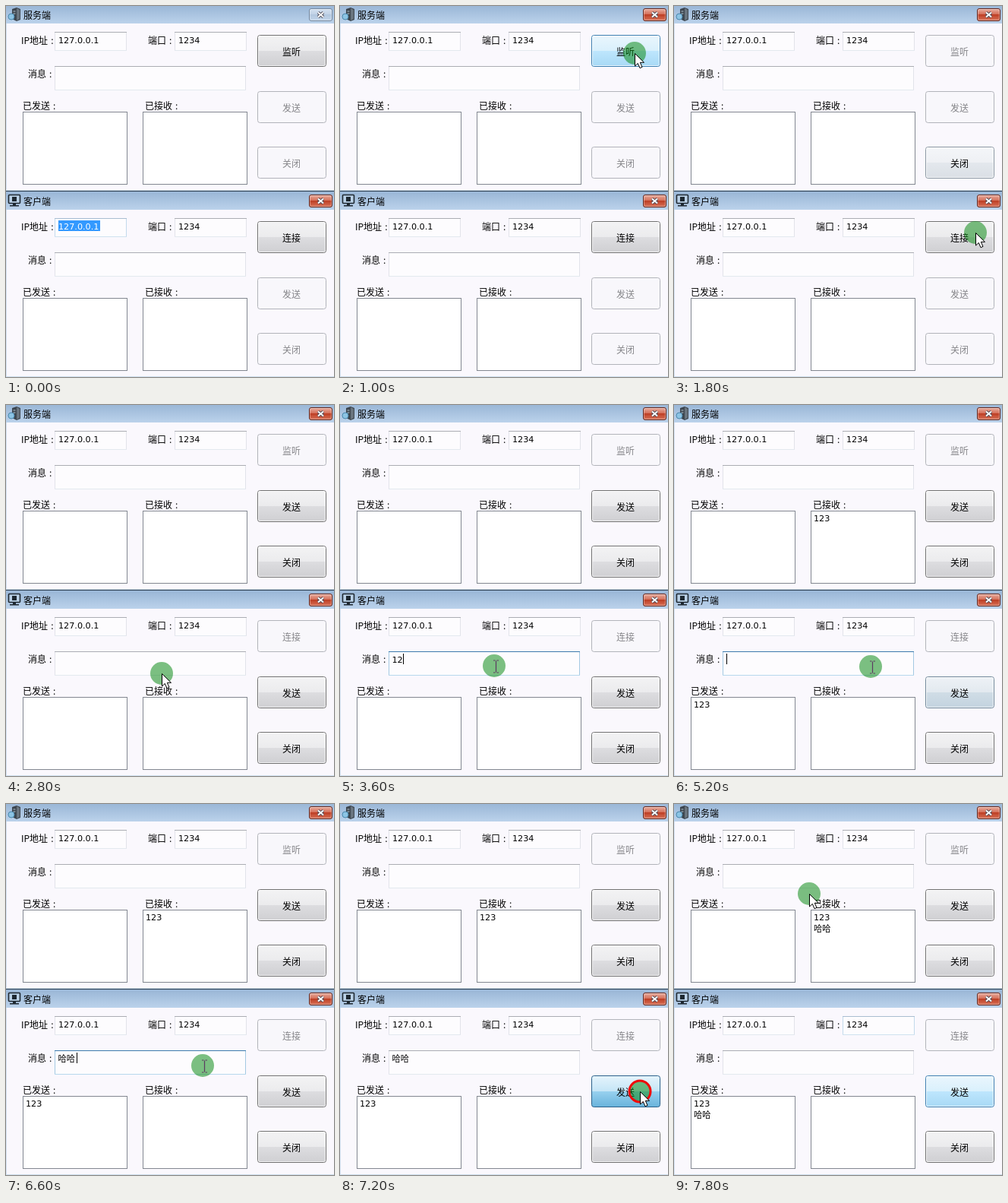
Animation, 432 px wide and 488 px high, one loop 8 s. Source, as an HTML page:

```html
<!DOCTYPE html>
<html lang="zh-CN">
<head>
<meta charset="utf-8">
<title>Socket</title>
<style>
html, body { margin: 0; width: 100%; height: 100%; overflow: hidden; background: #faf8fd; }
svg { display: block; width: 432px; height: 488px; }
text { font: 12px "Noto Sans CJK SC", "Noto Sans CJK", sans-serif; white-space: pre; }
.num { font: 11.2px "DejaVu Sans", "Noto Sans CJK SC", sans-serif; }
</style>
</head>
<body>
<svg viewBox="0 0 432 488">
  <defs id="defs"></defs>
  <g id="stage"></g>
</svg>
<script>
const LOOP = 8000, STEP = 200;
const stage = document.getElementById('stage');

// border, four gradient colours, label colour
const BUTTONS = {
  normal: ['#707070', '#f3f3f4', '#ebebed', '#dddde0', '#cfcfd2', '#000'],
  off: ['#b2b4ba', '#f8f7fb', '#f8f7fb', '#f8f7fb', '#f8f7fb', '#858589'],
  fade: ['#71889a', '#eef2f6', '#e2e9ef', '#d0dde6', '#c3d3df', '#000'],
  fresh: ['#8a97a2', '#f4f6f9', '#eef0f4', '#e4e8ed', '#dadfe5', '#000'],
  hover: ['#3c7fb1', '#eaf6fd', '#d9f0fc', '#bee6fd', '#a7d9f5', '#000'],
  press: ['#2c628b', '#e5f4fc', '#c4e5f6', '#98d1ef', '#68b3db', '#000']
};

// top, sides, bottom
const EDGES = {
  plain: ['#abadb3', '#e2e3ea', '#e3e9ef'],
  soft: ['#a9bdd0', '#c3daec', '#cfe2f0'],
  focus: ['#3d7bad', '#a4c9e3', '#b7d9ed']
};

const gradient = (id, stops) =>
  `<linearGradient id="${id}" x2="0" y2="1">${stops.map(([o, c]) =>
    `<stop offset="${o}" stop-color="${c}"/>`).join('')}</linearGradient>`;

document.getElementById('defs').innerHTML =
  Object.entries(BUTTONS).map(([name, c]) =>
    gradient(name, [[0, c[1]], [.5, c[2]], [.5, c[3]], [1, c[4]]])).join('') +
  gradient('title', [[0, '#99b6d6'], [1, '#bbd2eb']]) +
  gradient('red', [[0, '#e9b0a2'], [.45, '#d5705a'], [.45, '#bb3a20'], [1, '#d9745a']]) +
  gradient('pale', [[0, '#d3e0ef'], [.45, '#c2d3e7'], [.45, '#b1c6de'], [1, '#c4d6ea']]);

// Last value whose start time has passed.
function at(t, plan) {
  let value;
  for (const key in plan) if (t >= +key) value = plan[key];
  return value;
}

const rect = (x, y, w, h, fill, more = '') =>
  `<rect x="${x}" y="${y}" width="${w}" height="${h}" fill="${fill}" ${more}/>`;
const text = (x, y, s, fill = '#000', cls = '') =>
  `<text x="${x}" y="${y}" fill="${fill}" class="${cls}">${s}</text>`;
const num = (x, y, s, fill) => text(x, y, s, fill, 'num');
const label = (x, y, s) => text(x, y, `${s}<tspan dx="4">:</tspan>`);

function button(y, s, state) {
  const [edge, , , , , ink] = BUTTONS[state];
  const shine = state === 'off' || state === 'press' ? '' :
    rect(332.5, y + 1.5, 88, 39, 'none', 'rx="2" stroke="#fff" stroke-opacity=".75"');
  return rect(331.5, y + .5, 90, 41, `url(#${state})`, `rx="3" stroke="${edge}"`) +
    shine + text(364, y + 26.5, s, ink);
}

function edit(x, y, w, h, state = 'plain') {
  const [top, side, bottom] = EDGES[state];
  return rect(x, y, w, h, side) + rect(x + 1, y + 1, w - 2, h - 2, '#fdfcfe') +
    rect(x, y, w, 1, top) + rect(x, y + h - 1, w, 1, bottom);
}

const list = (x, lines) =>
  rect(x + .5, 139.5, 137, 95, '#fff', 'stroke="#828790"') +
  lines.map((s, i) => num(x + 4, 153 + i * 14.5, s)).join('');

function closeBox(active) {
  const cross = 'M411 8.5l7 6m0-6l-7 6';
  return rect(399.5, 3.5, 30, 16, `url(#${active ? 'red' : 'pale'})`,
      `rx="2.5" stroke="${active ? '#64261d' : '#7488a0'}"`) +
    rect(400.5, 4.5, 28, 14, 'none', 'rx="2" stroke="#fff" stroke-opacity=".35"') +
    `<path d="${cross}" stroke="#4c4b58" stroke-width="3.8"/>` +
    `<path d="${cross}" stroke="#fff" stroke-width="2"/>`;
}

const towerIcon =
  '<path d="M8 4l6-2 5 2v14l-5 2-6-3z" fill="#3d464f"/>' +
  '<path d="M14 3v16l4-2V5z" fill="#69747e"/>' +
  '<path d="M9.500 7h3m-3 3h3" stroke="#b4c4d0"/>' +
  '<circle cx="7" cy="14" r="4" fill="#8cc4e4" stroke="#4a87ad"/>';
const screenIcon =
  rect(3.5, 3.5, 15, 11, '#b9d0e6', 'rx="1" stroke="#1d2730" stroke-width="1.6"') +
  rect(8, 6, 6, 6, '#1d2730') +
  '<path d="M9 15h4v2h4v1.500h-12V17h4z" fill="#1d2730"/>';

function panel(top, w) {
  return `<g transform="translate(0 ${top})">` +
    rect(0, -2, 432, 245, '#faf8fd') +
    rect(0, -2, 432, 1, '#2b3c4c') +
    rect(0, -1, 432, 24, 'url(#title)') +
    rect(0, 23, 1, 219, '#d3e1f0') + rect(0, 242, 432, 1, '#cfdfee') +
    w.icon + text(23, 16.5, w.title) + closeBox(w.active) +
    label(20, 49.5, 'IP地址') + edit(64, 34, 95, 25, w.ipEdge) +
    (w.selected ? rect(69, 37, 55, 14, '#3399ff') : '') +
    num(69, 49, '127.0.0.1', w.selected ? '#fff' : '#000') +
    label(187, 49.5, '端口') + edit(222, 34, 95, 25, w.portEdge) + num(227, 49, '1234') +
    label(29, 94, '消息') + edit(64, 79, 252, 32, w.msgEdge) +
    num(68.5, 94, w.msg || '') +
    (w.caret ? rect(w.caret, 82, 1, 14, '#000') : '') +
    label(22, 136, '已发送') + label(183, 136, '已接收') +
    list(22, w.sent) + list(180, w.got) +
    button(38, w.action, w.states[0]) +
    button(112, '发送', w.states[1]) +
    button(185, '关闭', w.states[2]) + '</g>';
}

// time, x, y
const PATH = [
  [400, 418, 130], [600, 392, 72], [800, 388, 62], [1000, 388, 62], [1200, 392, 150],
  [1400, 396, 262], [1600, 397, 298], [2200, 397, 298], [2400, 350, 318],
  [2600, 240, 350], [2800, 205, 353], [3000, 203, 343], [3800, 203, 343],
  [4000, 290, 360], [4200, 390, 380], [4400, 395, 380], [4600, 395, 380],
  [4800, 320, 358], [5000, 262, 345], [5200, 259, 344], [6600, 259, 344],
  [6800, 335, 360], [7000, 393, 376], [7200, 395, 378], [7400, 390, 374],
  [7600, 295, 262], [7800, 178, 118]
];

function place(t) {
  const i = PATH.findIndex(p => p[0] > t);
  if (i < 0) return PATH[PATH.length - 1].slice(1);
  const [a, b] = [PATH[i - 1], PATH[i]];
  const k = (t - a[0]) / (b[0] - a[0]);
  return [1, 2].map(n => a[n] + (b[n] - a[n]) * k);
}

function pointer(t) {
  if (t < PATH[0][0]) return '';
  const [x, y] = place(t);
  const click = [800, 2000, 3000, 4400, 7200].includes(t);
  const beam = x > 64 && x < 316 && y > 324 && y < 350;
  const shape = beam ?
    '<path d="M-1 -7h2.500m2 0h2.500m-3.500 .5v15m-3.500 .5h2.500m2 0h2.500" fill="none" stroke="#5c3b62" stroke-width="1.2"/>' :
    '<path d="M.5 .5v16.500l3.800-3.600 2.700 6.300 3-1.300-2.700-6.100h5.200z" fill="#fff" stroke="#000"/>';
  return `<g transform="translate(${x} ${y})">` +
    '<circle r="15" fill="#078811" fill-opacity=".53"/>' +
    (click ? '<circle r="14" fill="none" stroke="#f00808" stroke-width="3"/>' : '') +
    shape + '</g>';
}

function draw(t) {
  const server = {
    title: '服务端', icon: towerIcon, action: '监听', active: t >= 800, sent: [],
    got: at(t, { 0: [], 4600: ['123'], 7400: ['123', '哈哈'] }),
    states: [
      at(t, { 0: 'normal', 600: 'hover', 800: 'press', 1000: 'hover', 1200: 'off' }),
      at(t, { 0: 'off', 2400: 'fresh', 2800: 'normal' }),
      at(t, { 0: 'off', 1400: 'fresh', 2000: 'normal' })
    ]
  };
  const client = {
    title: '客户端', icon: screenIcon, action: '连接', active: true, got: [],
    selected: t < 800,
    ipEdge: t < 800 ? 'soft' : 'plain',
    portEdge: t >= 7600 ? 'soft' : 'plain',
    msgEdge: at(t, { 0: 'plain', 3000: 'focus', 4600: 'plain', 5200: 'focus', 7200: 'plain' }),
    msg: at(t, { 0: '', 3400: '1', 3600: '12', 3800: '123', 4600: '', 6400: '哈哈', 7400: '' }),
    caret: at(t, { 0: 0, 3000: 69, 3400: 76, 3600: 83, 3800: 90, 4200: 0,
      5200: 69, 5600: 0, 6000: 69, 6400: 93, 7000: 0 }),
    sent: at(t, { 0: [], 4600: ['123'], 7400: ['123', '哈哈'] }),
    states: [
      at(t, { 0: 'normal', 2000: 'press', 2200: 'hover', 2400: 'off' }),
      at(t, { 0: 'off', 2400: 'fresh', 2800: 'normal', 4200: 'fade', 4400: 'press',
        4600: 'hover', 5000: 'fade', 5400: 'fresh', 5600: 'normal',
        7000: 'fade', 7200: 'press', 7400: 'hover' }),
      at(t, { 0: 'off', 2400: 'fresh', 2800: 'normal' })
    ]
  };
  stage.innerHTML = panel(0, server) + panel(245, client) + pointer(t);
}

let start, shown = -1;
function tick(now) {
  start ??= now;
  const t = Math.floor((now - start) % LOOP / STEP) * STEP;
  if (t !== shown) draw(shown = t);
  requestAnimationFrame(tick);
}
draw(0);
requestAnimationFrame(tick);
</script>
</body>
</html>
```
